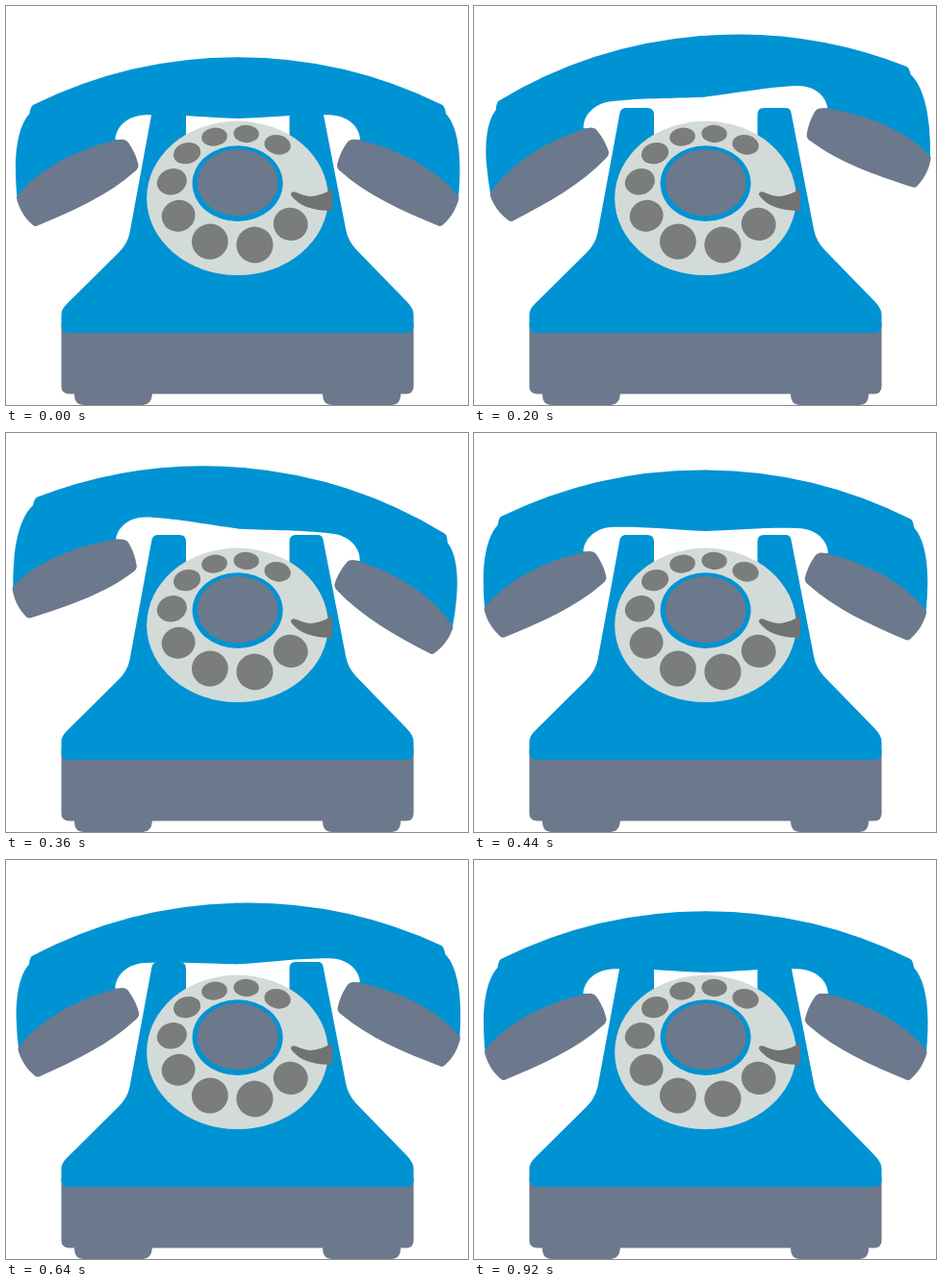
An HTML page that plays this animation: 480 by 415 pixels, repeating every 960 ms.

```html
<!DOCTYPE html>
<html lang="en">
<head>
<meta charset="utf-8">
<title>Ringing telephone</title>
<style>
  html, body { margin: 0; width: 100%; height: 100%; overflow: hidden; background: #fff; }
  svg { display: block; width: 480px; height: 415px; }
  .blue { fill: #0093d3; }
  .slate { fill: #6c788c; }
  .dial { fill: #d3dbd9; }
  .hole { fill: #7a7d7c; }
  .stop { fill: #707274; }
</style>
</head>
<body>
<svg viewBox="0 0 480 415">
  <g id="base">
    <path class="slate" d="M57.500 330H423.500V396Q423 403.500 416 403.500H410Q410 415 400 415H339Q329 415 329 403.500H152Q151 415 142 415H81Q71 415 71 403.500H65Q57.500 403 57.500 396Z"/>
    <path class="blue" d="M151.500 111Q153 106 158 106H180Q187 106 187 113V150H294.500V113Q294.500 106 301 106H324Q328.500 106 329.500 111L353 232Q355 244 364.500 254L417 308Q423.500 315 423.500 321V333Q423 340 416 340H65Q58 340 57.500 333V321Q57.500 315 64 309L116.500 257Q126 248 128.500 236Z"/>
  </g>
  <g id="dial">
    <ellipse class="dial" cx="240.500" cy="199.800" rx="94.300" ry="80.200"/>
    <ellipse class="blue" cx="240.600" cy="184.600" rx="47" ry="39.400"/>
    <ellipse class="slate" cx="240.700" cy="183.700" rx="42" ry="34.600"/>
    <g id="holes" class="hole"></g>
    <path class="stop" d="M296 196Q296 193 299.500 193.200C308 196 313 199 321 197.500Q331 195.500 339 190V213C325 213 308 210 301 202Q296.500 198 296 196Z"/>
  </g>
  <g id="handset">
    <path class="blue" id="grip" d="M240.750 53.300A480 480 0 0 0 28 103Q25.500 104.500 24.500 112C15 122 10 143 10 168Q10 185 11.500 199L70 190L119 139.500L113.500 139C114 127 125 113.500 146 113.300C180 112.600 203 115.500 240.750 117H241.500V53.300Z"/>
    <path class="slate" id="cup" d="M10.800 199.300C29 173 72 148.500 117 139Q124.500 137.500 127.500 142.500Q135 153.500 137.500 165Q138 169 134 172C106 197 70 213 32 228.800Q29 229.500 27 227C19 220 13 210 10.800 199.300Z"/>
    <g transform="matrix(-1 0 0 1 481.500 0)">
      <use href="#grip"/>
      <use href="#cup"/>
    </g>
  </g>
</svg>
<script>
  const LOOP = 960, STEP = 40;
  const RISE = 160, REST = 920, HEIGHT = 23.6;
  const PIVOT = [240.75, 141];
  const HOLES = 9;

  // turning points of the swing: [time, degrees]
  const swing = [[0, 0], [RISE, -7.3], [360, 5.1], [560, -6.7], [760, 6.4], [REST, 0]];

  // Holes run counter-clockwise; they grow and spread towards the viewer.
  function hole(i) {
    const part = i / (HOLES - 1);
    const deg = -53 - 270 * part + 16.4 * Math.sin(Math.PI * part) ** 1.4;
    const a = deg * Math.PI / 180;
    const x = 240.6 + 69 * Math.cos(a);
    const y = 191.4 + 59 * Math.sin(a);
    const near = (1 + Math.sin(a)) / 2;
    return `<ellipse rx="${13.2 + 6 * near}" ry="${9.2 + 9.8 * near}"
      transform="translate(${x} ${y}) rotate(${20 * Math.cos(a)})"/>`;
  }

  document.getElementById('holes').innerHTML =
    Array.from({ length: HOLES }, (_, i) => hole(i)).join('');

  const handset = document.getElementById('handset');

  // jumps up quickly, then sinks evenly
  function lift(t) {
    return HEIGHT * Math.max(0, Math.min(t / RISE, (REST - t) / (REST - RISE)));
  }

  function tilt(t) {
    const i = swing.findIndex(([time]) => time > t);
    if (i < 0) return 0;
    const [t0, a0] = swing[i - 1], [t1, a1] = swing[i];
    return a0 + (a1 - a0) * (t - t0) / (t1 - t0);
  }

  function draw(ms) {
    const t = Math.floor((ms % LOOP) / STEP) * STEP;
    handset.setAttribute('transform',
      `translate(0 ${-lift(t)}) rotate(${tilt(t)} ${PIVOT})`);
  }

  const start = performance.now();
  function tick() {
    draw(performance.now() - start);
    requestAnimationFrame(tick);
  }
  draw(0);
  requestAnimationFrame(tick);
</script>
</body>
</html>
```
